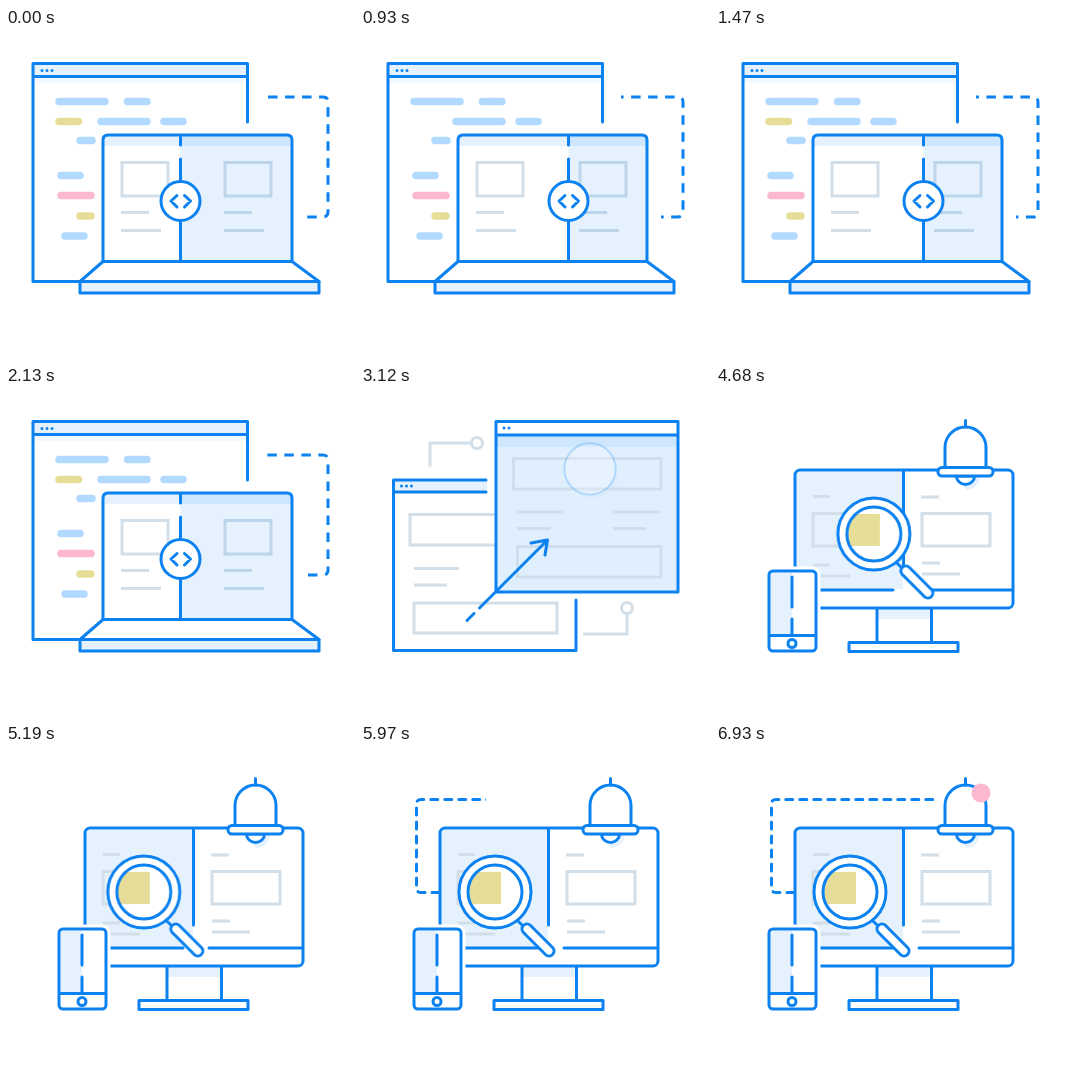
Write an HTML page that moves like this. It is 349x330 px and loops after 6960 ms.

```html
<!DOCTYPE html>
<html lang="en">
<head>
<meta charset="utf-8">
<title>Compare, deploy, notify</title>
<style>
  :root { --blue: #0b82f0; --pale: #e5f2fe; --gray: #d2dfe9; --loop: 6960ms; }
  html, body { margin: 0; width: 100%; height: 100%; overflow: hidden; background: #fff; }
  svg { display: block; width: 100vw; height: 100vh; }

  .line { fill: none; stroke: var(--blue); stroke-width: 3; stroke-linecap: round; stroke-linejoin: round; }
  .white { fill: #fff; }
  .pale { fill: var(--pale); }
  .gray { fill: none; stroke: var(--gray); stroke-width: 3; }
  .pill { stroke: #b2d9ff; stroke-width: 7.5; stroke-linecap: round; fill: none; }
  .yellow { stroke: #e6dd98; }
  .pink { stroke: #fbb8cf; }
  .dots { stroke: var(--blue); stroke-width: 3; stroke-linecap: round; stroke-dasharray: 0 5; fill: none; }
  .reveal { stroke: #fff; fill: none; stroke-dasharray: 1 2; }

  .scene, .move { animation: var(--loop) linear infinite; }
  .scene { animation-timing-function: step-end; visibility: hidden; }
  .compare { animation-name: first; }
  .deploy { animation-name: second; }
  .notify { animation-name: third; }
  @keyframes first { 0% { visibility: visible } 33.333%, 100% { visibility: hidden } }
  @keyframes second { 0% { visibility: hidden } 33.333% { visibility: visible } 66.667%, 100% { visibility: hidden } }
  @keyframes third { 0% { visibility: hidden } 66.667%, 100% { visibility: visible } }

  /* Compare */
  .move { animation-timing-function: ease-in-out; }
  .slider { animation-name: slide; }
  @keyframes slide {
    0%, 4.3%, 30.2%, 100% { transform: translateX(0) }
    13%, 21.5% { transform: translateX(33px) }
  }
  .retype { animation-name: retype; transform-origin: 49px 93px; }
  @keyframes retype {
    0%, 10%, 18.7%, 100% { transform: scaleX(1) }
    11.8%, 16.5% { transform: scaleX(0) }
  }
  .march { stroke-linecap: butt; stroke-dasharray: 9.5 7.5; animation: march calc(var(--loop) / 26) linear infinite; }
  @keyframes march { from { stroke-dashoffset: -2 } to { stroke-dashoffset: -19 } }

  /* Deploy */
  .window { animation-name: lift; }
  @keyframes lift {
    0%, 34.5% { transform: translate(-102px, 59px) }
    40.5%, 100% { transform: none }
  }
  .tint { animation-name: tint; }
  @keyframes tint { 0%, 40.5% { opacity: 0 } 43.8%, 100% { opacity: 1 } }
  .arrow { animation-name: arrow; }
  @keyframes arrow { 0%, 35.9% { stroke-dashoffset: 1 } 41.7%, 100% { stroke-dashoffset: 0 } }
  .badge { animation-name: drop; transform-origin: 229px 124px; }
  @keyframes drop {
    0%, 42.96% { transform: translateY(-53px) scale(.56); opacity: 0 }
    48.7%, 100% { transform: none; opacity: 1 }
  }
  .check { stroke-dasharray: 1 2; animation-name: check; }
  @keyframes check {
    0%, 48.7% { stroke-dashoffset: 1; opacity: 0 }
    48.8% { opacity: 1 }
    52.4%, 100% { stroke-dashoffset: 0; opacity: 1 }
  }

  /* Notify */
  .lens { animation-name: scan; animation-timing-function: ease-out; }
  @keyframes scan { 0%, 66.667% { transform: translateX(26px) } 78.3%, 100% { transform: none } }
  .signal { animation-name: signal; animation-timing-function: linear; }
  @keyframes signal { 0%, 79% { stroke-dashoffset: 1 } 89%, 100% { stroke-dashoffset: 0 } }
  .bell { animation-name: ring; transform-origin: 249.5px 38px; }
  @keyframes ring {
    0%, 87.6%, 98.5%, 100% { transform: rotate(0) }
    89.2% { transform: rotate(8deg) }
    91.2% { transform: rotate(-7deg) }
    93.2% { transform: rotate(5deg) }
    95.2% { transform: rotate(-3deg) }
    97% { transform: rotate(1.5deg) }
  }
  .alert { animation-name: pop; transform-origin: 265px 49px; }
  @keyframes pop {
    0%, 92% { transform: scale(0) }
    96.3% { transform: scale(1.12) }
    97.7%, 100% { transform: scale(1) }
  }
</style>
</head>
<body>
<svg viewBox="0 0 349 330" preserveAspectRatio="none">
  <defs>
    <clipPath id="screen"><path d="M97 233V112q0-5 5-5H281q5 0 5 5V233z"/></clipPath>
    <clipPath id="glass"><circle cx="134" cy="148" r="26"/></clipPath>
    <mask id="arrowMask" maskUnits="userSpaceOnUse" x="0" y="0" width="349" height="330">
      <path class="reveal move arrow" pathLength="1" stroke-width="40" d="M100 240 192 148"/>
    </mask>
    <mask id="signalMask" maskUnits="userSpaceOnUse" x="0" y="0" width="349" height="330">
      <path class="reveal move signal" pathLength="1" stroke-width="8" d="M93 148.500H60q-4.500 0-4.500-4.500V60q0-4.500 4.500-4.500H218"/>
    </mask>
  </defs>

  <g class="scene compare">
    <path class="pale" d="M27 35H242V48H27z"/>
    <path fill="#f3f9ff" d="M28 49H241V55H28z"/>
    <path class="line" d="M73 253.500H27V35.500H241.500V94M27 48.500H241"/>
    <path class="dots" d="M36 42.500H47"/>
    <path class="pill" d="M53 73.500H99M121.500 73.500H141M95 93.500H141M158 93.500H177M74 112.500H86M55 147.500H74M59 208H78"/>
    <path class="pill yellow move retype" d="M53 93.500H72.500"/>
    <path class="pill yellow" d="M74 188H85"/>
    <path class="pill pink" d="M55 167.500H85"/>
    <path class="line march" d="M260 69H317q5 0 5 5V184q0 5-5 5H300"/>

    <g clip-path="url(#screen)">
      <path class="white" d="M97 107H286V233H97z"/>
      <path class="pale" d="M97 107H286V118H97z"/>
      <path class="gray" d="M116 134.500H162V168H116zM115 184.500H143M115 202.500H155M219 134.500H265V168H219zM218 184.500H246M218 202.500H258"/>
      <rect class="move slider" x="174.500" y="107" width="150" height="126" fill="#0b82f0" fill-opacity=".105"/>
    </g>
    <path class="line white" d="M97 233.500H286L313 253.500H74z"/>
    <path class="line pale" d="M74 253.500H313V265H74z"/>
    <path class="line" d="M97 233.500V112q0-5 5-5H281q5 0 5 5V233.500"/>
    <g class="move slider">
      <path class="line" d="M174.500 109V117M174.500 131V232"/>
      <circle class="line white" cx="174.500" cy="173" r="19.500"/>
      <path class="line" d="M171 167.500 165 173 171 179M178.500 167.500 184.500 173 178.500 179"/>
    </g>
  </g>

  <g class="scene deploy">
    <path class="gray" d="M69 80.500V57H110M222 248H266V228"/>
    <circle class="gray white" cx="116" cy="57" r="5.500"/>
    <circle class="gray white" cx="266" cy="222" r="5.500"/>
    <path class="pale" d="M33 94H126V106H33z"/>
    <path class="gray" d="M136 128.500H49V159H136M53 182.500H98M53 199H86M53 217H196V247H53z"/>
    <path class="line" d="M125 94H32.500V264.500H215V214M33 106H125"/>
    <path class="dots" d="M40.500 100H51"/>

    <g class="move window">
      <path class="white" d="M135 35H317V206H135z"/>
      <path class="pale" d="M135 49H317V206H135z"/>
      <path class="gray" stroke-opacity=".85" d="M152.500 72.500H300V103H152.500zM156 126H202M252 126H299M156 142.500H190M252 142.500H285M156.500 160.500H300V191H156.500z"/>
      <g class="move tint">
        <path fill="#cee7fc" d="M135 49H317V61H135z"/>
        <path fill="#0b82f0" fill-opacity=".025" d="M135 61H317V206H135z"/>
      </g>
      <path class="line" d="M135 35.500H317V206H135zM135 49H317"/>
      <path class="dots" d="M143 42H153"/>
    </g>

    <g mask="url(#arrowMask)">
      <path class="line" d="M106 234.500 113 227.500M118.500 222 186 154.500M170 157 186.500 154 184 169"/>
    </g>
    <g class="move badge">
      <circle cx="232" cy="128.500" r="40" fill="#cfe6fa"/>
      <circle class="line white" cx="229" cy="124" r="39"/>
    </g>
    <path class="line move check" pathLength="1" d="M213 123.500 225 135.500 247 113.500"/>
  </g>

  <g class="scene notify">
    <g mask="url(#signalMask)">
      <path class="line" stroke-dasharray="7 7" d="M92 148.500H60q-4.500 0-4.500-4.500V60q0-4.500 4.500-4.500H217"/>
    </g>
    <path class="pale" d="M161 223H215V233H161z"/>
    <path class="line" d="M161 223V256M215.500 223V256"/>
    <path class="line white" d="M133 256.500H242V265.500H133z"/>
    <rect class="white" x="79" y="84" width="218" height="138" rx="5"/>
    <path class="pale" d="M80 86H187V203H80z"/>
    <path class="gray" d="M97 110.500H114M97 127.500H150V160H97zM97 179H114M97 190H134M205 111H223M206 127.500H274V160H206zM206 177H224M206 188H244"/>
    <rect class="line" x="79" y="84" width="218" height="138" rx="5"/>
    <path class="line" d="M187.500 85V181M80 204H177M203 204H296"/>

    <rect x="53" y="185" width="47" height="80" rx="4" fill="#fff" stroke="#fff" stroke-width="9"/>
    <rect class="line white" x="53" y="185" width="47" height="80" rx="4"/>
    <path class="pale" d="M55 187H76V248H55z"/>
    <path class="line" d="M54 249.500H99M76 191V221M76 233V248"/>
    <circle class="line white" stroke-width="2.500" cx="76" cy="257.500" r="4"/>

    <g class="move lens">
      <path class="line" d="M156 176 162 182"/>
      <path class="line" style="stroke-width:13" d="M166 185 188 207"/>
      <path class="line" style="stroke-width:7;stroke:#fff" d="M166 185 188 207"/>
      <circle class="line white" cx="134" cy="148" r="36"/>
      <path fill="#e6dd98" clip-path="url(#glass)" d="M108 128H140V160H108z"/>
      <circle class="line" cx="134" cy="148" r="27"/>
    </g>

    <path class="pale" d="M243 91H264Q262 103 250 104z"/>
    <g class="move bell">
      <path class="line white" d="M240.500 90a9 8.500 0 0 0 18 0z"/>
      <path class="line white" d="M229 82V61.500a20.500 20.500 0 0 1 41 0V82z"/>
      <path class="line" d="M249.500 34.500V41"/>
      <rect class="line white" x="222" y="81.500" width="55" height="8.500" rx="4"/>
    </g>
    <circle class="move alert" cx="265" cy="49" r="9.500" fill="#fbb8cf"/>
  </g>
</svg>
</body>
</html>
```
